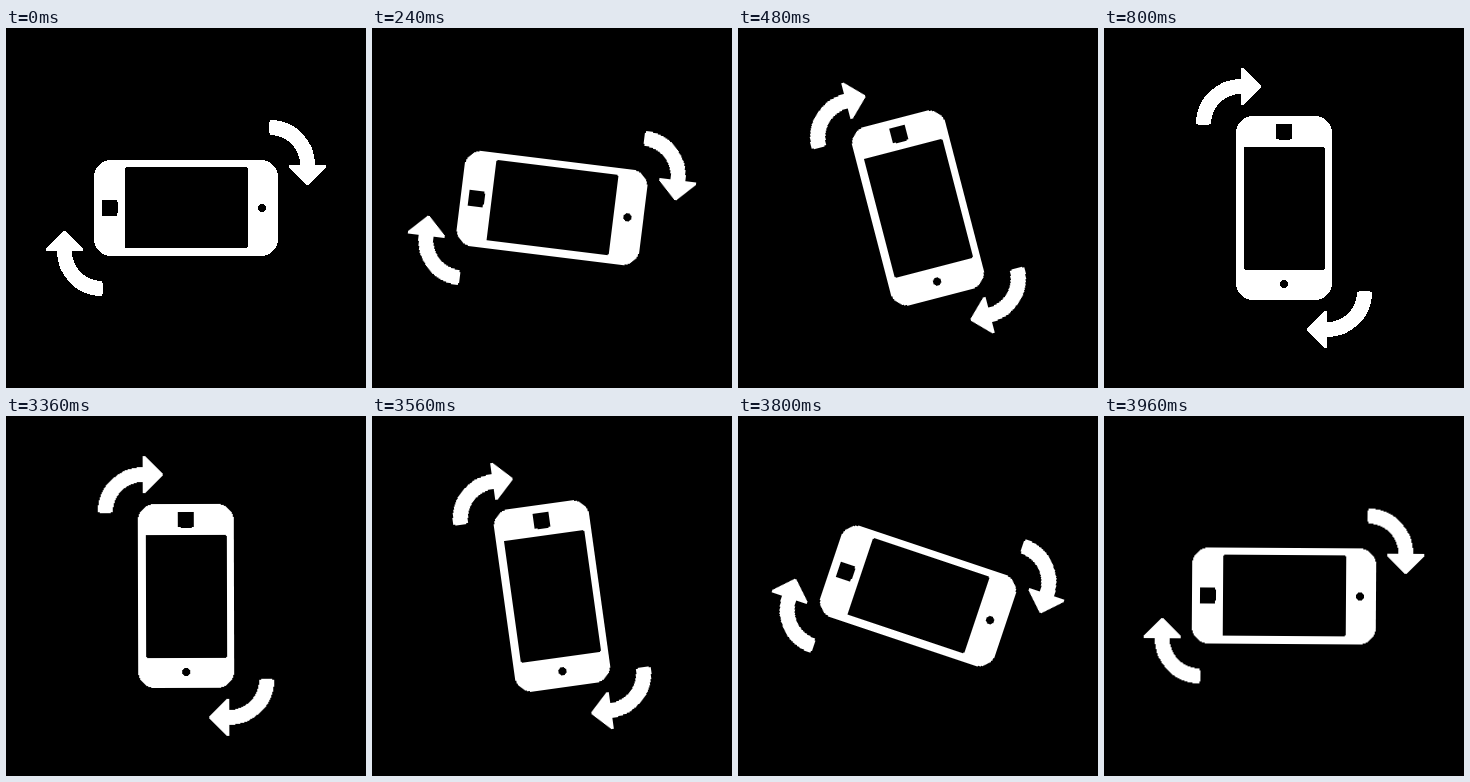
Animation of 360x360 px, one loop 4 s. Source, as an HTML page:

```html
<!DOCTYPE html>
<html lang="en">
<head>
<meta charset="utf-8">
<title>Rotate your phone</title>
<style>
  html, body { margin: 0; width: 100%; height: 100%; overflow: hidden; background: #000; }
  svg { display: block; width: 100vw; height: 100vh; shape-rendering: crispEdges; }
  #device { transform-origin: 180px 180px; }
</style>
</head>
<body>
<svg viewBox="0 0 360 360">
  <defs>
    <g id="arrow" stroke="#fff">
      <path d="M99.5 94.5A37.5 37.5 0 0 1 138 58.5" fill="none" stroke-width="15"/>
      <path d="M94 94.5h11" stroke-width="4" stroke-linecap="round"/>
      <path d="M138.5 42L155 58.5L138.5 75Z" fill="#fff" stroke-width="4" stroke-linejoin="round"/>
    </g>
  </defs>
  <g id="device">
    <rect x="132" y="88" width="96" height="184" rx="17" fill="#fff"/>
    <rect x="139.5" y="119" width="81" height="122.5" rx="1"/>
    <rect x="172" y="95.5" width="16" height="16" rx="2.5"/>
    <circle cx="180" cy="256" r="4"/>
    <use href="#arrow"/>
    <use href="#arrow" transform="rotate(180 180 180)"/>
  </g>
</svg>
<script>
  const LOOP = 4000, STEP = 40;
  const flat = 'rotate(-90deg)', upright = 'rotate(0deg)';

  const turn = document.getElementById('device').animate([
    { offset: 0, transform: flat, easing: 'cubic-bezier(.8, 0, .165, 1)' },
    { offset: 800 / LOOP, transform: upright },
    { offset: 3320 / LOOP, transform: upright, easing: 'cubic-bezier(.847, 0, .45, 1)' },
    { offset: 1, transform: flat }
  ], { duration: LOOP, fill: 'both' });
  turn.pause();

  // The motion runs at 25 steps per second; the slack absorbs timer jitter.
  const SLACK = 6;
  const start = performance.now();
  function draw() {
    const time = (performance.now() - start + SLACK) % LOOP;
    turn.currentTime = Math.floor(time / STEP) * STEP;
    requestAnimationFrame(draw);
  }
  draw();
</script>
</body>
</html>
```
